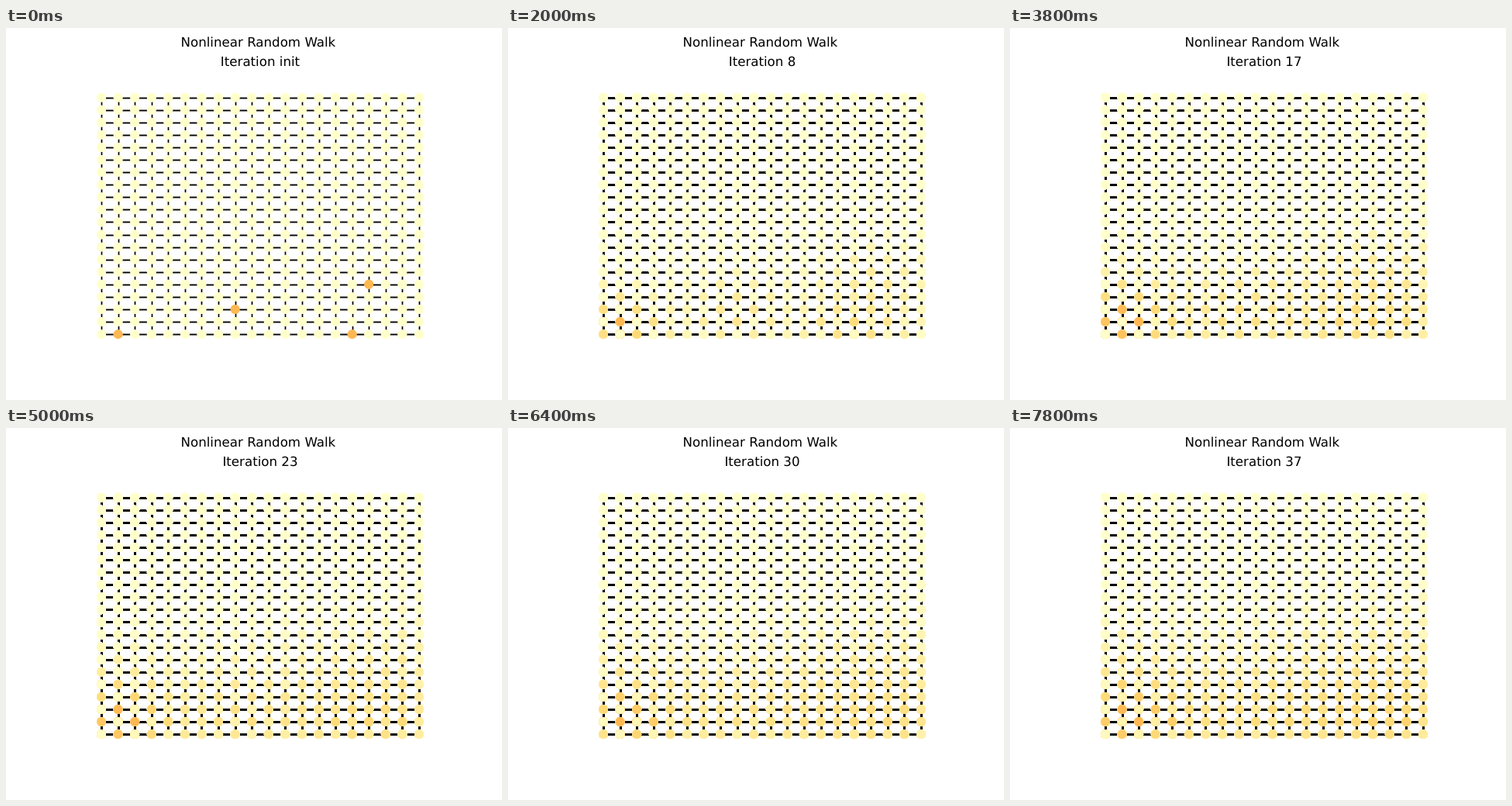
An HTML page with a canvas for the animation above (8 s loop, 640 by 480 pixels).

```html
<!DOCTYPE html>
<html lang="en">
<head>
<meta charset="utf-8">
<title>Nonlinear Random Walk</title>
<style>
  html, body { margin: 0; width: 100%; height: 100%; overflow: hidden; background: #fff; }
  canvas, svg { position: absolute; left: 0; top: 0; width: 640px; height: 480px; }
  text {
    font: 16.667px "DejaVu Sans", sans-serif;
    text-anchor: middle;
    text-rendering: geometricPrecision;
  }
</style>
</head>
<body>
<canvas id="stage" width="640" height="480"></canvas>
<svg viewBox="0 0 640 480">
  <text x="325.4" y="24">Nonlinear Random Walk</text>
  <text id="label" x="328" y="49">Iteration init</text>
</svg>
<script>
const SIZE = 20, STEP_MS = 200, FRAMES = 40;
const RADIUS = 5.95, PEAK = 0.355;
const LEFT = 123.04, RIGHT = 532.96, TOP = 89.67, BOTTOM = 395.13;
const WALKERS = [[1, 0], [8, 2], [15, 0], [16, 4]];
const RAMP = [[255, 255, 204], [255, 237, 160], [254, 217, 118], [254, 178, 76], [253, 141, 60]];

const ctx = document.getElementById('stage').getContext('2d');
const label = document.getElementById('label');

const nodeX = col => LEFT + (RIGHT - LEFT) * col / (SIZE - 1);
const nodeY = row => BOTTOM - (BOTTOM - TOP) * row / (SIZE - 1);
const snap = v => Math.floor(v + 0.5) + 0.5;

const neighbours = Array.from({ length: SIZE * SIZE }, (_, i) => {
  const col = i % SIZE, row = Math.floor(i / SIZE), list = [];
  if (col > 0) list.push(i - 1);
  if (col < SIZE - 1) list.push(i + 1);
  if (row > 0) list.push(i - SIZE);
  if (row < SIZE - 1) list.push(i + SIZE);
  return list;
});

// Every node shares its mass equally among its neighbours.
function walk(state) {
  const next = new Array(state.length).fill(0);
  state.forEach((mass, i) => {
    for (const j of neighbours[i]) next[j] += mass / neighbours[i].length;
  });
  return next;
}

function rampColor(value) {
  const pos = value * 8, i = Math.min(Math.floor(pos), RAMP.length - 2);
  const rgb = RAMP[i].map((c, n) => Math.round(c + (RAMP[i + 1][n] - c) * (pos - i)));
  return `rgb(${rgb})`;
}

function stateColors(state) {
  const max = Math.max(...state);
  return state.map(mass => rampColor(PEAK * mass / max));
}

let state = new Array(SIZE * SIZE).fill(0);
for (const [col, row] of WALKERS) state[row * SIZE + col] = 1;

// The starting state is painted twice more before the walk sets off.
const layers = [stateColors(state), stateColors(state)];
for (let k = 1; k < FRAMES; k++) {
  layers.push(stateColors(state));
  state = walk(state);
}

const edges = new Path2D();
for (let i = 0; i < SIZE; i++) {
  const x = snap(nodeX(i)), y = snap(nodeY(i));
  edges.moveTo(LEFT, y);
  edges.lineTo(RIGHT, y);
  edges.moveTo(x, TOP);
  edges.lineTo(x, BOTTOM);
}

function drawNodes(colors) {
  colors.forEach((color, i) => {
    ctx.fillStyle = color;
    ctx.beginPath();
    ctx.arc(nodeX(i % SIZE), nodeY(Math.floor(i / SIZE)), RADIUS, 0, 2 * Math.PI);
    ctx.fill();
  });
}

// Each frame paints over the earlier ones, so soft edges build up.
function draw(frame) {
  const visible = layers.slice(0, frame + 2);
  ctx.fillStyle = '#fff';
  ctx.fillRect(0, 0, 640, 480);
  ctx.strokeStyle = '#000';
  ctx.lineWidth = 1.389;
  visible.forEach(() => ctx.stroke(edges));
  visible.forEach(drawNodes);
  label.textContent = 'Iteration ' + (frame < 2 ? 'init' : frame - 2);
}

const start = performance.now();
let shown = -1;
function tick() {
  const frame = Math.floor((performance.now() - start) / STEP_MS) % FRAMES;
  if (frame !== shown) draw(shown = frame);
  requestAnimationFrame(tick);
}
tick();
</script>
</body>
</html>
```
